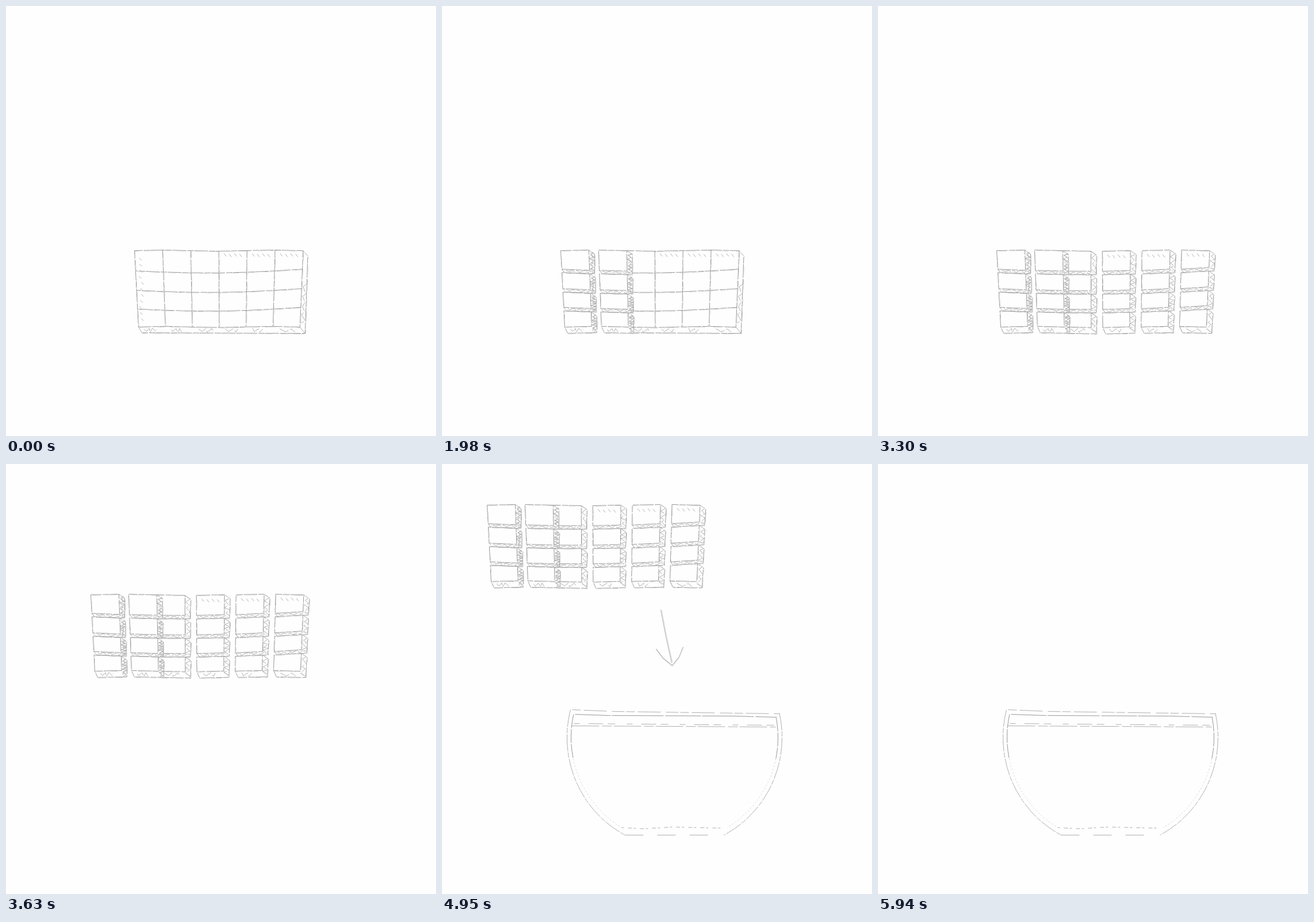
An HTML page with a canvas for the animation above (6.27 s loop, 748 by 748 pixels).

```html
<!DOCTYPE html>
<html lang="en">
<head>
<meta charset="utf-8">
<title>Chocolate into a bowl</title>
<style>
html, body { margin: 0; width: 100%; height: 100%; overflow: hidden; background: #fefefe; }
canvas { display: block; width: 748px; height: 748px; }
</style>
</head>
<body>
<canvas id="stage" width="748" height="748"></canvas>
<script>
const ctx = document.getElementById('stage').getContext('2d');
const STEP = 330, STEPS = 19;
const PAPER = '#fefefe', DARK = '#989898', MID = '#b0b0b0', LIGHT = '#d8d8d8';
const COLS = 6, ROWS = 4, SIDE = 10;

const mix = (a, b, t) => a + (b - a) * t;
const range = (from, to) => Array.from({ length: to - from }, (_, i) => from + i);

function random(seed) {
  let s = seed * 7919 + 13;
  return () => (s = (s * 16807) % 2147483647) / 2147483647;
}

// The bar is a grid that narrows downwards and sags in its middle rows.
const lineY = row => 425 + 36 * row - 0.7 * row * row;
function gridY(col, row) {
  const inner = row > 0 && row < ROWS;
  return lineY(row) + (inner ? 5 * Math.sin(Math.PI * col / COLS) - col * 0.5 : -Math.sin(col * 1.6));
}
function gridX(col, y) {
  const t = (y - 425) / 133;
  return mix(223 + 48.9 * col, 230 + 46.8 * col, t);
}
// Breaking off a column pushes the later ones to the right.
const push = col => Math.max(0, col - 2) * 20;
const looseShift = col => col === 0 ? -17 : push(col);

function pen(points, color = DARK, dash = []) {
  ctx.strokeStyle = color;
  ctx.setLineDash(dash);
  ctx.beginPath();
  for (const [x, y] of points) ctx.lineTo(x, y);
  ctx.stroke();
}

function sketch(points) {
  ctx.lineDashOffset = points[0][0] * 7 + points[0][1];
  pen(points, DARK, [24, 2, 11, 1]);
  pen(points.map(([x, y]) => [x + 1, y + 1]), LIGHT, [13, 9, 19, 14]);
  ctx.lineDashOffset = 0;
}

function zigzag(x1, y1, x2, y2, count, width, seed, color = MID) {
  const rnd = random(seed), length = Math.hypot(x2 - x1, y2 - y1);
  const nx = (y1 - y2) / length, ny = (x2 - x1) / length;
  const points = range(0, count + 1).map(i => {
    const t = Math.min(1, Math.max(0, (i + rnd() * 0.8 - 0.4) / count));
    const off = (i % 2 ? 1 : -1) * width * (0.2 + rnd() * 0.3);
    return [mix(x1, x2, t) + nx * off, mix(y1, y2, t) + ny * off];
  });
  pen(points, color, [17, 3]);
}

function ticks(x, y) {
  for (const i of range(0, 4)) {
    const tx = x + i * 9, ty = y + i % 2;
    pen([[tx, ty], [tx + 4, ty + 5]], MID);
  }
}

function baseMarks(col, dx) {
  const rnd = random(col + 3), x = gridX(col, 563) + dx + 8 + rnd() * 8;
  zigzag(x, 564, x + 14 + rnd() * 14, 564, 6 - Math.ceil(col / 2), 8, col + 1);
}

function bar(from) {
  const dx = push(from), cols = range(from, COLS + 1), rows = range(0, ROWS + 1);
  const node = (col, row) => {
    const y = gridY(col, row);
    return [gridX(col, y) + dx, y];
  };
  for (const row of rows) sketch(cols.map(col => node(col, row)));
  for (const col of cols) sketch(rows.map(row => node(col, row)));

  const [lx, ly] = node(from, ROWS), [tx, ty] = node(COLS, 0), [bx, by] = node(COLS, ROWS);
  sketch([[lx, ly], [lx + 6, 568], [bx + 9, 569]]);
  sketch([[tx, ty], [tx + 8, ty + 9], [tx + 7, ty + 42], [bx + 9, 569]]);
  pen([[bx, by], [bx + 9, 569]], MID);
  zigzag(bx + 8, 483, bx + 5, 552, 9, 8, 5);

  for (const col of range(from, COLS)) {
    baseMarks(col, dx);
    if (col > 2) ticks(gridX(col, 430) + 9 + dx, 430);
  }
  if (from === 0) {
    const rnd = random(4);
    for (const i of range(0, 11)) {
      const x = 230 + rnd() * 6, y = 438 + i * 10.5;
      pen([[x, y], [x + 4, y + 4]], MID);
    }
  }
}

function block(col, row) {
  const dx = looseShift(col), last = row === ROWS - 1, seed = col * ROWS + row + 1;
  const corner = (c, r, gap) => {
    const y = gridY(c, r) + gap;
    return [gridX(c, y) + dx, y];
  };
  const topGap = row ? 3 : 0, bottomGap = last ? 0 : -3, depth = last ? 11 : 6;
  const tl = corner(col, row, topGap), tr = corner(col + 1, row, topGap);
  const bl = corner(col, row + 1, bottomGap), br = corner(col + 1, row + 1, bottomGap);
  const shoulder = [tr[0] + SIDE, tr[1] + 7];
  const heel = [br[0] + SIDE - 1, br[1] + depth], toe = [bl[0] + 5, bl[1] + depth];

  ctx.fillStyle = PAPER;
  ctx.beginPath();
  for (const p of [tl, tr, shoulder, heel, toe, bl]) ctx.lineTo(...p);
  ctx.fill();

  sketch([tl, tr, br, bl, tl]);
  sketch([bl, toe, heel]);
  sketch([tr, shoulder, heel]);
  pen([br, heel], LIGHT);

  const mid = SIDE / 2, dense = col < 2;
  zigzag(tr[0] + mid, tr[1] + 6, br[0] + mid, heel[1] - 3, dense ? 11 : 6, SIDE, seed);
  if (dense) zigzag(tr[0] + mid, tr[1] + 4, br[0] + mid, heel[1], 9, SIDE, seed + 40);
  if (last) baseMarks(col, dx);
  else zigzag(bl[0] + 6, bl[1] + 3, br[0] + 2, br[1] + 3, 8, 4, seed + 60);
  if (row === 0 && col > 2) ticks(tl[0] + 9, tl[1] + 6);
}

// Right to left, so a side wall hides the edge of its neighbour.
function blocks(count = COLS) {
  for (const col of range(0, count).reverse())
    for (const row of range(0, ROWS)) block(col, row);
}

function at(dx, dy, scale, draw) {
  ctx.save();
  ctx.translate(dx, dy);
  ctx.scale(scale, scale);
  draw();
  ctx.restore();
}

function drop(x, y, width) {
  const scale = width / 378;
  at(x - 206 * scale, y - 422 * scale, scale, blocks);
}

function rays() {
  for (const i of range(0, 16)) {
    const a = i * Math.PI / 8, c = Math.cos(a), s = Math.sin(a);
    sketch([[378 + 199 * c, 498 + 129 * s], [378 + 225 * c, 498 + 146 * s]]);
  }
}

// One side of an elliptical bowl wall between two heights.
function wall(side, rx, ry, top, bottom, color, dash) {
  const cy = 475, from = Math.asin((top - cy) / ry), to = Math.asin((bottom - cy) / ry);
  ctx.strokeStyle = color;
  ctx.setLineDash(dash);
  ctx.beginPath();
  if (side > 0) ctx.ellipse(404, cy, rx, ry, 0, from, to);
  else ctx.ellipse(404, cy, rx, ry, 0, Math.PI - from, Math.PI - to, true);
  ctx.stroke();
}

function bowl() {
  pen([[226, 427], [300, 430], [587, 434]], MID, [15, 5, 40, 9, 22, 3]);
  pen([[231, 435], [290, 437], [505, 438], [582, 440]], DARK, [62, 2, 90, 3]);
  pen([[229, 451], [580, 454]], MID, [10, 15, 26, 8, 13, 20]);
  pen([[225, 455], [580, 457]], MID, [48, 5, 17, 3]);
  for (const side of [-1, 1]) {
    const tilt = 3 + 3 * side;
    wall(side, 187, 191.4, 427 + tilt, 645, MID, [30, 2, 9, 2]);
    wall(side, 180, 182.6, 435 + tilt, 512, DARK, [24, 2]);
    wall(side, 180, 182.6, 512, 632, LIGHT, [3, 3]);
  }
  pen([[312, 632], [350, 634], [400, 631], [490, 633]], MID, [4, 7, 7, 3]);
  pen([[318, 645], [475, 645]], MID, [32, 24]);
}

function arrow() {
  const shaft = [[380, 253], [389, 300], [399, 345]];
  const head = [[372, 321], [384, 337], [400, 350], [412, 335], [419, 318]];
  pen(shaft, MID);
  at(1.5, 0, 1, () => pen(shaft, LIGHT));
  pen(head);
  at(0, 1.5, 1, () => pen(head, LIGHT));
}

function draw(step) {
  ctx.setTransform(1, 0, 0, 1, 0, 0);
  ctx.fillStyle = PAPER;
  ctx.fillRect(0, 0, 748, 748);
  ctx.translate(0.5, 0.5);
  ctx.lineWidth = 1;

  if (step < 5) {
    bar(0);
    if (step >= 1 && step <= 3) rays();
  } else if (step < 11) {
    const loose = step - 4;
    if (loose < COLS) bar(loose);
    blocks(loose);
  } else if (step === 11) {
    at(-59, -198, 1, blocks);
  } else if (step < 16) {
    at(-128, -354, 1, blocks);
  } else if (step === 16) {
    drop(217, 201, 337);
  } else if (step === 17) {
    ctx.save();
    ctx.beginPath();
    ctx.rect(0, 0, 748, 433);
    ctx.clip();
    drop(235, 363, 331);
    ctx.restore();
  }

  const slide = Math.max(0, 14 - step);
  if (step >= 12) at(slide * -233, slide ? 1 : 0, 1, bowl);
  if (step === 15) arrow();
}

const start = performance.now();
function tick() {
  draw(Math.floor((performance.now() - start) / STEP) % STEPS);
  requestAnimationFrame(tick);
}
tick();
</script>
</body>
</html>
```
